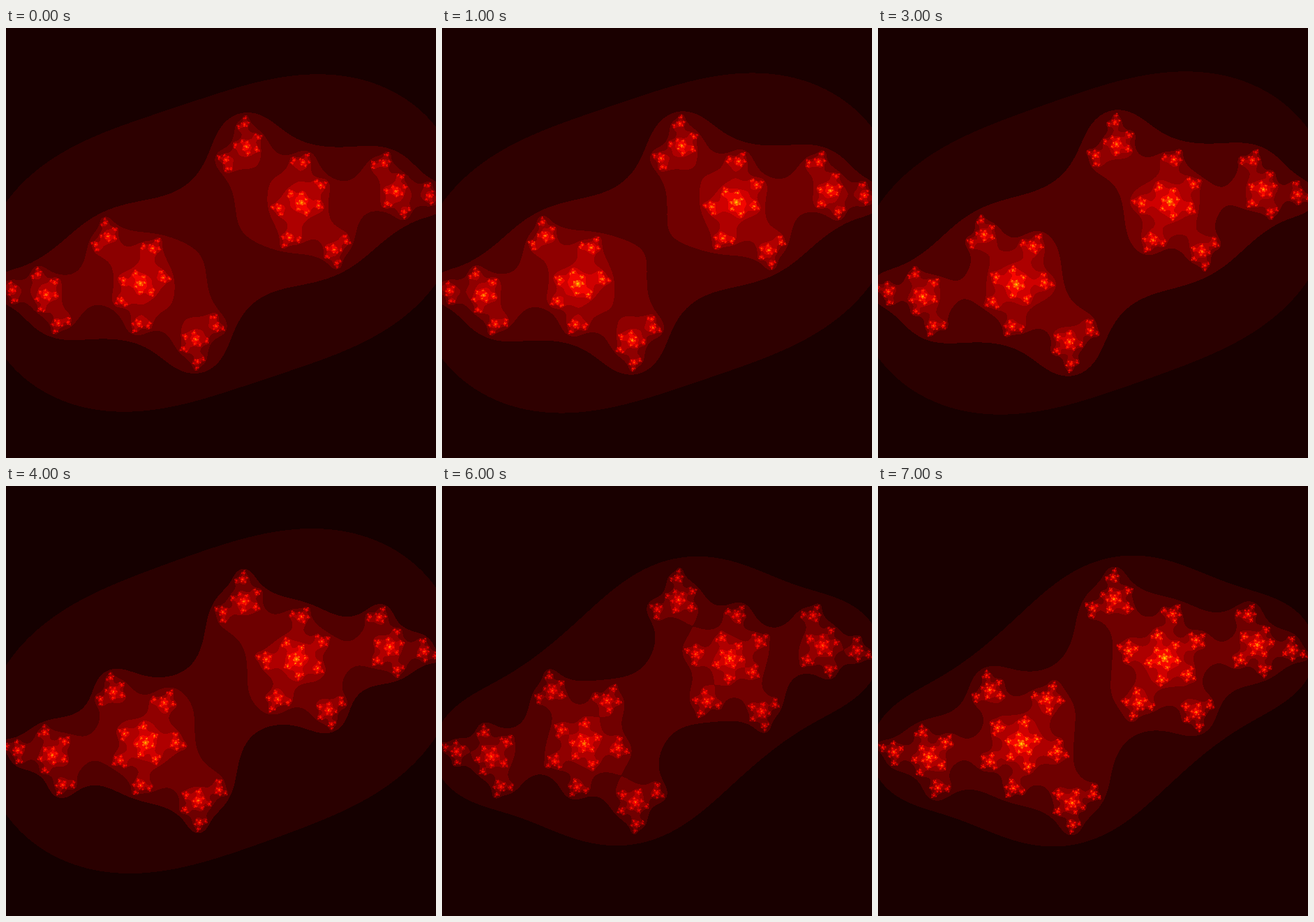
An HTML page with a canvas for the animation above (8 s loop, 616 by 616 pixels).

```html
<!DOCTYPE html>
<html lang="en">
<head>
<meta charset="utf-8">
<title>Julia set</title>
<style>
html, body { margin: 0; width: 100%; height: 100%; overflow: hidden; background: #170000; }
canvas { display: block; width: 616px; height: 616px; }
</style>
</head>
<body>
<canvas id="view" width="616" height="616"></canvas>
<script>
const SIZE = 616, SCALE = 205.1, MID = (SIZE - 1) / 2;
const STEP_MS = 1000;
// Highest iteration count of each step; it sets the colour range.
const PEAKS = [44, 42, 40, 47, 52, 58, 64, 58];
const ctx = document.getElementById('view').getContext('2d');
const cache = [];

function escapeCount(x, y, cx, cy, limit) {
  let n = 0, xx = x * x, yy = y * y;
  while (n < limit && xx + yy <= 4) {
    y = 2 * x * y + cy;
    x = xx - yy + cx;
    xx = x * x;
    yy = y * y;
    n++;
  }
  return n;
}

// Black - red - yellow - white ramp, v in 0..255.
function heat(v) {
  const u = v / 255;
  const unit = a => Math.max(0, Math.min(1, a)) * 255;
  return [
    unit(0.0416 + 0.9584 * u / 0.365),
    unit((u - 0.365) / 0.381),
    unit((u - 0.746) / 0.254)
  ];
}

// Average the used colours that share a coarse RGB cell.
function buildPalette(hist) {
  const cells = new Map(), palette = [];
  for (let v = 0; v < 256; v++) {
    const rgb = heat(v);
    const key = (rgb[0] >> 5) * 64 + (rgb[1] >> 5) * 8 + (rgb[2] >> 5);
    if (!cells.has(key)) cells.set(key, [0, 0, 0, 0]);
    const cell = cells.get(key);
    rgb.forEach((a, i) => { cell[i] += a * hist[v]; });
    cell[3] += hist[v];
    palette.push(cell);
  }
  return palette.map(([r, g, b, n]) => n ? [r / n, g / n, b / n] : [0, 0, 0]);
}

function render(step) {
  const peak = PEAKS[step], cx = -0.8 + 0.02 * step, cy = -0.6;
  const total = SIZE * SIZE, half = total / 2;
  const shade = new Uint8Array(total), hist = new Float64Array(256);
  for (let i = 0; i < half; i++) {
    const px = i % SIZE - MID, py = MID - Math.floor(i / SIZE);
    let sum = 0;
    for (let k = 0; k < 4; k++) {
      const x = (px + (k & 1) / 2 - 0.25) / SCALE;
      const y = (py + (k >> 1) / 2 - 0.25) / SCALE;
      sum += escapeCount(x, y, cx, cy, peak);
    }
    const v = Math.min(255, Math.floor(sum / 4 / peak * 256));
    // The set is symmetric under a half turn.
    shade[i] = shade[total - 1 - i] = v;
    hist[v] += 2;
  }
  const palette = buildPalette(hist);
  const img = ctx.createImageData(SIZE, SIZE);
  for (let i = 0; i < total; i++) {
    const rgb = palette[shade[i]];
    img.data[i * 4] = rgb[0];
    img.data[i * 4 + 1] = rgb[1];
    img.data[i * 4 + 2] = rgb[2];
    img.data[i * 4 + 3] = 255;
  }
  return img;
}

let shown = -1;
function draw(time) {
  const step = Math.floor(time / STEP_MS) % PEAKS.length;
  if (step !== shown) {
    ctx.putImageData(cache[step], 0, 0);
    shown = step;
  }
}

PEAKS.forEach((_, step) => { cache[step] = render(step); });
const start = performance.now();
draw(0);
requestAnimationFrame(function tick(now) {
  draw(Math.max(0, now - start));
  requestAnimationFrame(tick);
});
</script>
</body>
</html>
```
